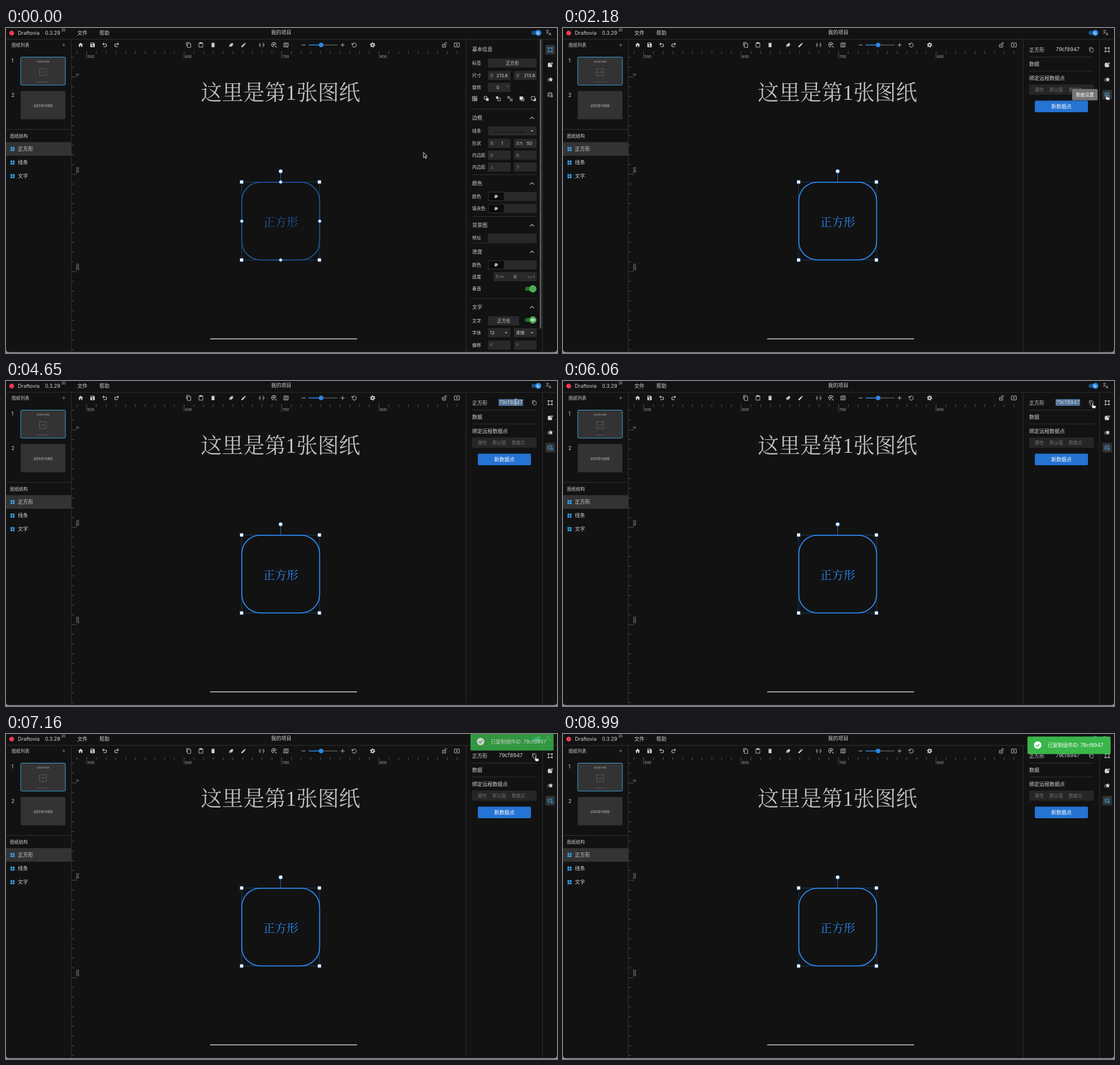
An HTML page for the animation above (9050 ms loop, 974 px wide and 575 px high).

```html
<!DOCTYPE html>
<html lang="zh-CN">
<head>
<meta charset="utf-8">
<title>我的项目</title>
<style>
html, body { margin: 0; width: 100%; height: 100%; overflow: hidden; background: #929292; }
svg { display: block; width: 974px; height: 575px; font-family: Inter, "Noto Sans CJK SC", "Noto Sans CJK", sans-serif; }
.song { font-family: "Liberation Serif", "Noto Serif CJK SC", "Noto Sans CJK SC", serif; font-weight: 300; }
</style>
</head>
<body>
<svg id="stage" viewBox="0 0 974 575" xmlns="http://www.w3.org/2000/svg"></svg>
<script>
const LOOP = 9050;
const INK = '#d2d2d2', DIM = '#8c8c8c', FIELD = '#292929', EDGE = '#303030', BLUE = '#2b87e3';

// ---- drawing helpers ----
const rect = (x, y, w, h, fill, extra = '') =>
  `<rect x="${x}" y="${y}" width="${w}" height="${h}" fill="${fill}" ${extra}/>`;
const circle = (x, y, r, fill, extra = '') => `<circle cx="${x}" cy="${y}" r="${r}" fill="${fill}" ${extra}/>`;
const line = (x1, y1, x2, y2, color = EDGE, w = 1) =>
  `<path d="M${x1} ${y1}L${x2} ${y2}" stroke="${color}" stroke-width="${w}"/>`;
const text = (x, cy, str, size = 9, fill = INK, anchor = 'start', extra = '') =>
  `<text x="${x}" y="${cy + size * 0.36}" font-size="${size}" fill="${fill}" text-anchor="${anchor}" ${extra}>${str}</text>`;
const mid = (x, cy, str, size, fill, extra) => text(x, cy, str, size, fill, 'middle', extra);
const group = (id, body) => `<g id="${id}">${body}</g>`;

// Icons live on a 24-unit grid centred on (x, y).
const icon = (x, y, body, color = INK, size = 10.4) => {
  const k = size / 24;
  return `<g transform="translate(${x - 12 * k} ${y - 12 * k}) scale(${k})" fill="${color}" color="${color}">${body}</g>`;
};
const solid = d => `<path d="${d}" fill-rule="evenodd"/>`;
const stroke = (d, w = 2) => `<path d="${d}" fill="none" stroke="currentColor" stroke-width="${w}"/>`;

const gear = circle(12, 12, 5.5, 'none', 'stroke="currentColor" stroke-width="4"') +
  circle(12, 12, 8.6, 'none', 'stroke="currentColor" stroke-width="4" stroke-dasharray="4.5"');
const undo = stroke('M8 3L4 8l5 5M4 8h10a5.5 5.5 0 0 1 0 11H7', 2.4);
const copy = solid('M16 1H4a2 2 0 0 0-2 2v14h2V3h12zM8 5h11a2 2 0 0 1 2 2v14a2 2 0 0 1-2 2H8a2 2 0 0 1-2-2V7a2 2 0 0 1 2-2zM8 7v14h11V7z');
const frame = stroke('M5 5h14v14H5z') +
  [[2, 2], [17, 2], [2, 17], [17, 17]].map(([x, y]) => rect(x, y, 5, 5, 'currentColor')).join('');
const database = stroke('M3 6c0-4 16-4 16 0s-16 4-16 0v12c0 2 3 3 7 3M3 12c0 2 3 3 8 3M19 6v5') +
  `<g transform="translate(11 11) scale(.55)">${gear}</g>`;
const palette = solid('M12 3a9 9 0 1 0 0 18c2 0 2-2 1-3 0-2 1-2 3-2 3 0 5-2 5-5 0-5-4-8-9-8zM6 10h3v3H6zM9 6h3v3H9zM14 6h3v3h-3z');
const twoBoxes = stroke('M3 3h11v11H3zM10 10h11v11H10z');

function header() {
  return line(0, 20, 974, 20) + circle(10, 9, 4.3, '#e33c50') +
    text(21, 9, 'Draftovia') + text(69, 9, '0.3.29') + text(98, 4.5, '2D', 5.5) +
    text(126, 9, '文件') + text(165, 9, '帮助') + mid(486.5, 8, '我的项目') +
    rect(929, 5, 16, 7, '#1d4f84', 'rx="3.5"') + circle(941, 8.5, 5.2, BLUE) +
    icon(941, 8.5, stroke('M10 5a8 8 0 1 0 9 9a6 6 0 0 1-9-9z', 2.6), '#fff', 7) +
    text(954, 7, '文', 6.5) + text(959.5, 10.5, 'A', 6.5);
}

function toolbar() {
  const items = [
    [132, solid('M10 20v-6h4v6h5v-8h3L12 3 2 12h3v8z')],
    [153, solid('M17 3H5a2 2 0 0 0-2 2v14a2 2 0 0 0 2 2h14a2 2 0 0 0 2-2V7zM12 19a3 3 0 1 1 0-6 3 3 0 0 1 0 6zM15 9H5V5h10z')],
    [174.5, undo],
    [195.5, `<g transform="matrix(-1 0 0 1 24 0)">${undo}</g>`],
    [323, copy],
    [344.5, stroke('M4 4h16v17H4z') + rect(7, 1, 10, 6, 'currentColor')],
    [366, solid('M6 7h12v12a2 2 0 0 1-2 2H8a2 2 0 0 1-2-2zM5 4h3.5l1-1h5l1 1H19v2H5z')],
    [398, solid('M3 21l3-11 8-5 6 6-5 7-9 2 6-6-1-1zM16 3l5 5-1 2-6-6z')],
    [420, solid('M3 17v4h4L18 10l-4-4zM15 5l4 4 2-2-4-4z')],
    [452, stroke('M7 4C3 4 5 7 5 9s-1 3-4 3c3 0 4 1 4 3s-2 5 2 5M17 4c4 0 2 3 2 5s1 3 4 3c-3 0-4 1-4 3s2 5-2 5') + solid('M8 11h2v2H8zM14 11h2v2h-2z')],
    [474, stroke('M20 11a9 9 0 1 0-9 9M11 6v10M6 11h10M16 16l6 6', 2.4)],
    [495, stroke('M3 5l6-2 6 2 6-2v16l-6 2-6-2-6 2zM9 3v16M15 5v16')],
    [526, stroke('M4 12h16')],
    [595, stroke('M4 12h16M12 4v16')],
    [615.5, stroke('M4 10a8.5 8.5 0 1 1 0 5M2 5l2 6 6-2', 2.3)],
    [648, gear],
    [775, stroke('M4 10h13v11H4zM13 10V6a4 4 0 0 1 8 0v2') + rect(9, 14, 3, 3, 'currentColor')],
    [797, stroke('M2 4h20v16H2z') + solid('M10 8v8l6-4z')]
  ];
  return items.map(([x, body]) => icon(x, 30, body)).join('') +
    line(557, 30, 586, 30, '#555', 1.6) + line(535, 30, 557, 30, BLUE, 1.6) + circle(557, 30, 4, BLUE);
}

function rulers() {
  let out = '';
  const step = 17.23, tick = '#666';
  for (let i = -1; i < 39; i++) {
    const x = 142.6 + i * step, major = i % 10 === 0;
    out += line(x, 41, x, major ? 54 : 46, tick, 0.8);
    if (major) out += text(x + 1.5, 51, 500 + i * 10, 6.5, '#a8a8a8');
  }
  for (let i = -2; i < 29; i++) {
    const y = 86.5 + i * step, major = i % 10 === 0;
    out += line(116, y, major ? 125 : 120, y, tick, 0.8);
    if (major) out += `<text transform="translate(129.3 ${y - 2}) rotate(-90)" font-size="6.5" fill="#a8a8a8">${i * 10}</text>`;
  }
  return out;
}

function sidebar() {
  let out = line(115.5, 20, 115.5, 573) + line(0, 179.5, 115, 179.5) +
    text(10, 30, '图纸列表', 7.8) + icon(102, 30, stroke('M4 12h16M12 4v16'), DIM, 9) +
    text(9.5, 58, '1') + text(9.5, 119, '2') +
    rect(26, 51.5, 79, 49.5, '#333', 'rx="2" stroke="#3ba3d6"') +
    mid(65.5, 60, '这里是第1张图纸', 3.1, '#aaa') +
    rect(59.5, 72, 12, 12, 'none', 'stroke="#777" stroke-width=".6"') + mid(65.5, 78, '正方形', 2, '#999') +
    line(55, 95.5, 76, 95.5, '#777', 0.5) +
    rect(26, 111.5, 79, 50, '#333', 'rx="2"') + mid(65.5, 137.5, '这里是第2张图纸', 4.5, '#bbb') +
    text(7, 191, '图纸结构', 7.9) + rect(0, 202, 115, 24, '#333');
  ['正方形', '线条', '文字'].forEach((name, i) => {
    const y = 214 + i * 24;
    for (const dx of [-3.6, 0.4]) for (const dy of [-3.6, 0.4])
      out += rect(11.5 + dx, y + dy, 3.3, 3.3, '#35a0e8', 'rx=".5"');
    out += text(21, y, name);
  });
  return out;
}

function canvas() {
  const knob = (x, y) => rect(x - 3, y - 3, 6, 6, '#fff', 'stroke="#2a5d94" stroke-width=".8"');
  const anchor = (x, y) => circle(x, y, 2.7, '#fff', `stroke="${BLUE}" stroke-width=".9"`);
  return mid(485.2, 113, '这里是第1张图纸', 37.6, '#c0c0c0', 'class="song"') +
    line(361, 550, 620.5, 550, '#cfcfcf', 1.6) +
    rect(416.5, 272.5, 138, 138, 'none', 'stroke="#1f4d7d" stroke-width=".7"') +
    rect(416.8, 272.8, 137.6, 137.6, 'none', 'id="box" rx="33" stroke-width="1.8"') +
    mid(485.7, 344, '正方形', 20.6, '', 'id="boxText" class="song"') +
    line(485.5, 254, 485.5, 272, '#2a6fb8', 0.9) +
    circle(485.5, 253.5, 3.3, '#fff', `stroke="${BLUE}" stroke-width=".9"`) +
    knob(416.5, 272.3) + knob(554, 272.3) + knob(416.5, 410.3) + knob(554, 410.3) +
    group('anchors', anchor(485.5, 272.5) + anchor(416.8, 341.7) + anchor(554.5, 341.7) + anchor(485.5, 410.5));
}

// ---- property panel ----
const field = (x, cy, w) => rect(x, cy - 8, w, 16, FIELD, 'rx="1"');
const label = (cy, str) => text(824, cy, str, 7.9);
const drop = (x, y) => `<path d="M${x - 2} ${y - 1}h4l-2 2.2z" fill="${INK}"/>`;
const pair = (cy, name, a, va, b, vb) => label(cy, name) + field(852, cy, 40) + field(898, cy, 40) +
  text(855.5, cy, a, 6.2, DIM) + mid(877, cy, va, 8) + text(901.5, cy, b, 6.2, DIM) + mid(925.5, cy, vb, 8);
const section = (cy, name) => line(824, cy - 15.5, 938, cy - 15.5) + text(824, cy, name) +
  icon(930, cy, stroke('M3 17l9-9 9 9', 2.6), INK, 9.5);
const swatch = (cy, name) => label(cy, name) + rect(852.5, cy - 7.5, 28, 15, '#0b0b0b', 'stroke="#333"') +
  rect(880.5, cy - 8, 57.5, 16, FIELD) + icon(866.5, cy, palette, INK, 8);
const toggle = cy => rect(917.5, cy - 3.5, 16, 7, '#286b2d', 'rx="3.5"') + circle(931.3, cy, 6.4, '#4caf50');

function propPanel() {
  const arrange = [
    stroke('M3 3h18v18H3zM7 7h7v7H7zM11 11h7v7h-7z'),
    stroke('M3 3h11v11H3z') + rect(10, 10, 11, 11, 'currentColor'),
    rect(3, 3, 9, 9, 'currentColor') + stroke('M10 10h11v11H10z'),
    stroke('M3 3h7v7H3zM14 14h7v7h-7zM10 10l4 4'),
    rect(3, 3, 14, 14, 'currentColor') + stroke('M17 10h4v11H10v-4'),
    stroke('M3 3h14v14H3z') + solid('M18 10h4v12H10v-4h8z')
  ];
  return text(824, 38, '基本信息') +
    label(62, '标签') + field(852, 62, 86) + mid(895, 62, '正方形', 7.9) +
    pair(84, '尺寸', '宽', '213.6', '高', '213.6') +
    label(105, '旋转') + field(852, 105, 40) + mid(869.5, 105, '0', 8) + text(884.5, 105, '°', 8, DIM) +
    arrange.map((body, i) => icon(828.5 + i * 20.8, 125, body)).join('') +
    section(159, '边框') +
    label(182, '线条') + field(852, 182, 86) + line(862, 184, 918, 184, '#0a0a0a', 0.9) + drop(930, 182) +
    pair(204, '形状', '宽', '1', '圆角', '50') +
    pair(225, '内边距', '左', '', '右', '') + pair(246, '内边距', '上', '', '下', '') +
    section(275, '颜色') + swatch(298, '颜色') + swatch(319.5, '填充色') +
    section(349, '背景图') + label(371.5, '地址') + field(852, 371.5, 86) +
    section(396, '进度') + swatch(419, '颜色') +
    label(440, '进度') + field(862, 440, 76) + text(866, 440, '0 &lt;=', 6.5, '#a5a5a5') +
    mid(900, 440, '0', 8) + text(934, 441, '&lt;= 1', 6.2, '#a5a5a5', 'end') +
    label(461, '垂直') + toggle(461.5) +
    section(494, '文字') + label(518, '文字') + field(852, 518, 55) + mid(880, 518, '正方形', 7.9) + toggle(516.5) +
    icon(931.3, 516.5, solid('M1 12c5-9 17-9 22 0-5 9-17 9-22 0zM12 7a5 5 0 1 0 0 10a5 5 0 0 0 0-10z') + circle(12, 12, 3, 'currentColor'), '#fff', 8) +
    label(539, '字体') + field(852, 539, 40) + text(855.5, 539, '12', 8) + drop(884, 539) +
    field(898, 539, 40) + text(901.5, 539, '宋体', 7.8) + drop(930, 539) +
    pair(561, '偏移', 'X', '', 'Y', '') +
    rect(943.5, 20.5, 3, 511, '#5a5a5a');
}

function dataPanel() {
  return text(824, 38.5, '正方形') +
    rect(870.8, 32, 43.2, 12, '#4d6f99', 'id="mark"') + mid(892.3, 38, '79cf8947', 9.2) +
    icon(934, 38.5, copy, '#b8b8b8', 9.5) +
    line(824, 51.5, 938, 51.5) + text(824, 64, '数据') + line(824, 76, 938, 76) +
    text(824, 88.5, '绑定远程数据点') + rect(824, 100, 114, 18, '#262626') +
    text(834, 109, '属性', 7.9, '#727272') + text(860, 109, '默认值', 7.9, '#727272') + text(894, 109, '数据点', 7.9, '#727272') +
    rect(834, 128.5, 94, 20.5, '#2573d2', 'rx="2"') + mid(881, 139, '新数据点', 9, '#fff', 'font-weight="500"');
}

function strip() {
  const lit = (id, y) => rect(953.5, y - 8.5, 17, 17, '#323232', `id="${id}" rx="2"`);
  return line(813.5, 20, 813.5, 573) + line(948.5, 20, 948.5, 573) +
    lit('lit1', 38.5) + lit('lit4', 118) +
    group('tab1', icon(962, 38.5, frame, 'inherit')) +
    icon(962, 65, solid('M7 4h7a5 5 0 0 0 6 7v5a6 6 0 0 1-6 6H8a6 6 0 0 1-6-6V9a5 5 0 0 1 5-5z') + circle(19, 6, 3.4, 'currentColor')) +
    icon(962, 91, solid('M14 2l3 6 6 1-4 5 1 7-6-3-6 3 1-7-4-5 6-1z') + stroke('M1 13h5M1 18h4M3 8h3')) +
    group('tab4', icon(962, 118, database, 'inherit'));
}

const tip = () => rect(900, 108, 45, 20, '#757575', 'rx="2"') + mid(922.5, 118, '数据设置', 7.9, '#fff');
const toast = () => rect(821, 4.5, 147, 31, '#39b64a', 'rx="2"') + circle(839, 19.5, 6.6, '#fff') +
  '<path d="M835.8 19.6l2.3 2.3 4.2-4.4" fill="none" stroke="#39b64a" stroke-width="1.4"/>' +
  text(857, 20, '已复制组件ID: 79cf8947', 8.8, '#fff');

function pointers() {
  return group('arrow', '<path d="M0 0v9.6l2.2-2 1.5 3.3 1.5-.7-1.5-3.2h3z" fill="#111" stroke="#eee" stroke-width=".9"/>') +
    group('hand', '<path d="M-1 .7C-1-.6 1-.6 1 .7v3.2l3.4.8c1 .2 1.3.8 1.1 1.8L5 9.5H.2L-2.6 6c-.6-1 .3-1.6 1-1l.6.6z" fill="#fff" stroke="#111" stroke-width=".8"/>') +
    group('beam', stroke('M-2.4-5.4Q0-5.4 0-4V4Q0 5.4-2.4 5.4M2.4-5.4Q0-5.4 0-4M0 4Q0 5.4 2.4 5.4', 1));
}

const stage = document.getElementById('stage');
stage.innerHTML =
  '<path d="M0 0H974V568q0 5.5-5.5 5.5H5.5Q0 573.5 0 568z" fill="#121212"/>' +
  header() + toolbar() + rulers() + sidebar() + canvas() +
  group('props', propPanel()) + group('data', dataPanel()) + strip() +
  group('tip', tip()) + group('toast', toast()) +
  `<g id="pointer" color="#c8c8c8">${pointers()}</g>`;
const ui = {};
stage.querySelectorAll('[id]').forEach(el => { ui[el.id] = el; });
for (const [id, body] of [['tab1', frame], ['tab4', database]]) ui[id].firstChild.removeAttribute('color');

// ---- motion ----
const clamp = p => Math.max(0, Math.min(1, p));
const bezier = (x1, y1, x2, y2) => p => {
  if (p <= 0 || p >= 1) return clamp(p);
  const at = (a, b, u) => 3 * a * u * (1 - u) ** 2 + 3 * b * u * u * (1 - u) + u ** 3;
  let lo = 0, hi = 1;
  for (let i = 0; i < 24; i++) {
    const u = (lo + hi) / 2;
    if (at(x1, x2, u) < p) lo = u; else hi = u;
  }
  return at(y1, y2, lo);
};
const ease = bezier(0.25, 0.1, 0.25, 1), jump = bezier(0.215, 0.61, 0.355, 1);
const smooth = p => p * p * (3 - 2 * p), speedUp = p => p ** 1.6, slowDown = p => 1 - (1 - p) ** 1.8;
const linear = p => p;

// time, x, y, easing used to get there
const path = [
  [60, 738, 220], [440, 961, 118, smooth],
  [3060, 961, 118], [3230, 924, 57, speedUp], [3450, 899, 37, slowDown],
  [4340, 899, 37], [4350, 900, 37, linear],
  [4600, 900, 37], [4710, 902.5, 37, smooth],
  [4940, 902.5, 37], [5070, 903, 37, smooth],
  [5460, 903, 36.5, linear], [5710, 943, 38.5, smooth],
  [5940, 943, 38.5], [6060, 936.5, 39, smooth],
  [7570, 936.5, 39], [7700, 941, 74, speedUp], [7960, 978, 500, linear], [8000, 1000, 560, linear]
];
function pointerAt(t) {
  let i = path.findIndex(k => k[0] > t);
  if (i === 0) return path[0].slice(1, 3);
  if (i < 0) return path[path.length - 1].slice(1, 3);
  const a = path[i - 1], b = path[i];
  const p = (b[3] || linear)((t - a[0]) / (b[0] - a[0]));
  return [a[1] + (b[1] - a[1]) * p, a[2] + (b[2] - a[2]) * p];
}
const inside = (x, y, l, t, r, b) => x >= l && x <= r && y >= t && y <= b;
const show = (el, on) => el.setAttribute('visibility', on ? 'visible' : 'hidden');
const place = (el, x, y) => el.setAttribute('transform', `translate(${x.toFixed(2)} ${y.toFixed(2)})`);

function render(t) {
  const [x, y] = pointerAt(t), dataOn = t >= 2180, hover = t < 90;
  const overTab = inside(x, y, 953, 109, 971, 127);
  const overCopy = dataOn && inside(x, y, 929, 32, 939.5, 46);
  const overId = dataOn && inside(x, y, 870, 30, 915, 45);
  place(ui.pointer, x, y);
  show(ui.hand, overTab || overCopy);
  show(ui.beam, overId);
  show(ui.arrow, !(overTab || overCopy || overId));

  ui.box.setAttribute('stroke', hover ? '#1d5796' : '#2c8af8');
  ui.boxText.setAttribute('fill', hover ? '#1d5796' : '#2c8af8');
  show(ui.anchors, hover);

  ui.props.style.display = dataOn ? 'none' : '';
  ui.data.style.display = dataOn ? '' : 'none';
  show(ui.mark, t >= 3600 && t < 6600);
  show(ui.lit1, !dataOn);
  show(ui.lit4, dataOn || overTab);
  [[ui.tab1, !dataOn], [ui.tab4, dataOn]].forEach(([el, on]) => {
    const c = on ? '#3fa9f5' : INK;
    el.firstChild.setAttribute('fill', c);
    el.setAttribute('color', c);
  });

  const tipIn = jump(clamp((t - 390) / 300)), tipOut = jump(clamp((t - 3150) / 300));
  ui.tip.setAttribute('opacity', tipIn * (1 - tipOut));
  place(ui.tip, 0, -9.7 * (1 - tipIn) - 9.7 * tipOut);

  const drop = ease(clamp((t - 6655) / 1000));
  ui.toast.setAttribute('opacity', drop);
  place(ui.toast, 0, -32 * (1 - drop));
}

const start = performance.now();
function loop() {
  render((performance.now() - start) % LOOP);
  requestAnimationFrame(loop);
}
render(0);
requestAnimationFrame(loop);
</script>
</body>
</html>
```
